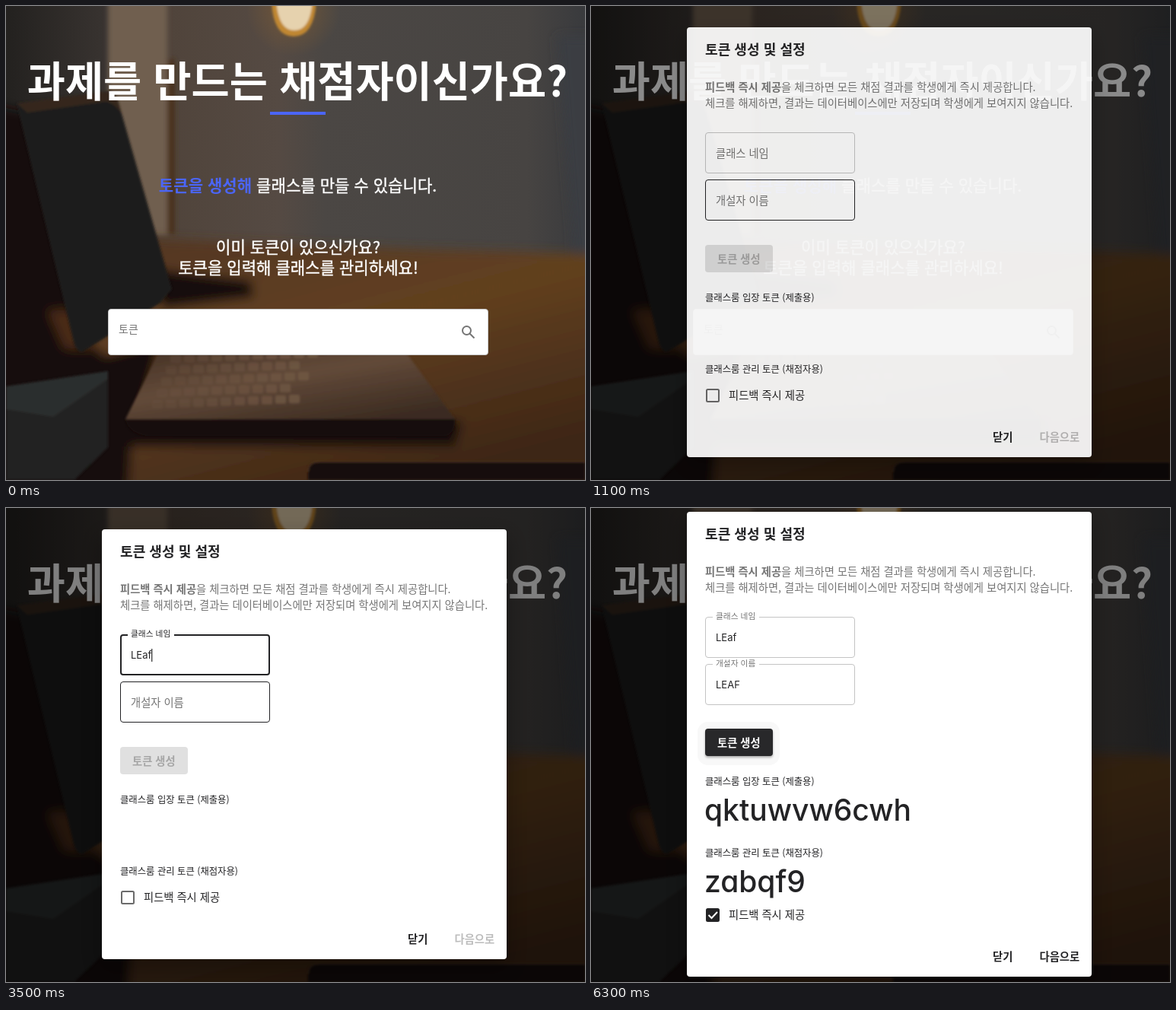
Write an HTML page that moves like this. It is 761 px wide and 623 px high and loops after 7900 ms.

```html
<!DOCTYPE html>
<html lang="ko">
<head>
<meta charset="utf-8">
<title>토큰 생성</title>
<style>
  html, body { margin: 0; width: 100%; height: 100%; overflow: hidden; background: #2b2623; }
  svg { display: block; width: 761px; height: 623px; }
  text { font: 14.3px "Noto Sans CJK KR", "Noto Sans CJK", sans-serif; fill: #232325; white-space: pre; }
  .page text { fill: #fff; font-size: 21.1px; font-weight: 500; text-anchor: middle; }
  .page .lead { stroke: #fff; stroke-width: .4px; }
  .page .head { font-size: 54.5px; font-weight: 700; }
  .page .hint { font-size: 14px; font-weight: 400; fill: #757575; text-anchor: start; }
  .link { fill: #4b65f7; font-weight: 700; stroke: none; }
  .bold { font-weight: 700; }
  .title { font-size: 18.1px; font-weight: 700; }
  .gray { fill: #757575; }
  .small { font-size: 12.35px; }
  .value { font: 13px Inter, sans-serif; }
  .token { font: 500 39px Inter, sans-serif; font-feature-settings: "cv11"; }
  #paper { filter: drop-shadow(0 11px 14px rgba(0, 0, 0, .3)); }
</style>
</head>
<body>
<svg viewBox="0 0 761 623">
  <defs>
    <linearGradient id="wall">
      <stop offset="0" stop-color="#23211f"/><stop offset=".17" stop-color="#383330"/>
      <stop offset=".28" stop-color="#50443b"/><stop offset=".47" stop-color="#554a43"/>
      <stop offset=".55" stop-color="#4b4744"/><stop offset=".9" stop-color="#474442"/>
      <stop offset="1" stop-color="#393a3d"/>
    </linearGradient>
    <linearGradient id="desk" x2=".6" y2="1">
      <stop offset="0" stop-color="#4f3424"/><stop offset=".5" stop-color="#62401f"/>
      <stop offset="1" stop-color="#3c2516"/>
    </linearGradient>
    <linearGradient id="base" x1=".2" x2=".8" y2="1">
      <stop offset="0" stop-color="#3f2c20"/><stop offset=".5" stop-color="#624a39"/>
      <stop offset="1" stop-color="#3a2a20"/>
    </linearGradient>
    <radialGradient id="glow">
      <stop offset="0" stop-color="#e8a52c" stop-opacity=".6"/><stop offset=".5" stop-color="#a36b25" stop-opacity=".2"/>
      <stop offset="1" stop-color="#a36b25" stop-opacity="0"/>
    </radialGradient>
    <filter id="soft"><feGaussianBlur stdDeviation="7"/></filter>
    <filter id="medium"><feGaussianBlur stdDeviation="3"/></filter>
    <filter id="crisp"><feGaussianBlur stdDeviation="1.5"/></filter>
    <clipPath id="buttonShape"><rect x="150" y="314" width="89" height="36" rx="4"/></clipPath>
  </defs>

  <rect width="761" height="623" fill="url(#wall)"/>
  <g filter="url(#medium)">
    <path d="M134-10h78v312h-78z" fill="#6f5f50"/>
    <path d="M212 70h10v230h-10z" fill="#4a301e"/>
  </g>
  <g filter="url(#soft)">
    <path d="M-20 340L190 306 560 320 790 326V650H-20z" fill="url(#desk)"/>
    <path d="M725 40h60v286h-38z" fill="#3a3d42"/>
    <path d="M-20 130L30 140 120 470-20 480z" fill="#17110d"/>
    <path d="M-20 330L45 370 130 460 205 440 165 575 160 650H-20z" fill="#150f0b"/>
    <path d="M55 400l50 0 12 50-40 0z" fill="#4a2a14"/>
    <path d="M190 345l132 16 4 22-120 14z" fill="#15100c"/>
    <path d="M130 545h470l-10 34H150z" fill="#130d0a"/>
  </g>
  <g filter="url(#crisp)">
    <path d="M14 128L132 112Q143 111 147 124L218 372 203 390 100 455Q92 455 88 438z" fill="#1e1c1a"/>
    <path d="M14 128L132 112Q143 111 147 124L152 142Q140 124 128 126L28 140z" fill="#35281f"/>
    <path d="M200 457L505 427 590 543H157z" fill="url(#base)"/>
    <path d="M157 543h433q1 18-12 22H185q-24-4-28-22z" fill="#16100d"/>
    <g id="keys" fill="#705743"/>
    <path d="M0 500L134 480V580L90 623H0z" fill="#222423"/>
    <path d="M0 500L134 480V490L62 540 0 530z" fill="#2c2e2d"/>
    <path d="M397 623v-12q0-12 14-12H761v24z" fill="#151110"/>
    <path d="M397 612q1-13 14-13H761" fill="none" stroke="#5d3c27"/>
  </g>
  <circle cx="378" cy="4" r="62" fill="url(#glow)"/>
  <g filter="url(#crisp)">
    <path d="M349-10h59q-2 50-30 50T349-10z" fill="#c08730"/>
    <path d="M355-10h48q-2 42-24 42T355-10z" fill="#e6d2ae"/>
  </g>

  <g class="page">
    <text class="head" x="383" y="119">과제를 만드는 채점자이신가요?</text>
    <rect x="347" y="139" width="73" height="4" fill="#4b65f7"/>
    <text class="lead" x="383.500" y="244"><tspan class="link">토큰을 생성해</tspan> 클래스를 만들 수 있습니다.</text>
    <text class="lead" x="384" y="324.5">이미 토큰이 있으신가요?</text>
    <text class="lead" x="384" y="351.5">토큰을 입력해 클래스를 관리하세요!</text>
    <rect x="134.5" y="398.5" width="499" height="60" rx="3.5" fill="#fff" stroke="#c8c8c8"/>
    <text class="hint" x="148" y="430">토큰</text>
    <g fill="none" stroke="#757575" stroke-width="2">
      <circle cx="605.5" cy="426.5" r="5.5"/><path d="M609.5 430.5l6 6"/>
    </g>
  </g>

  <rect id="shade" width="761" height="623"/>
  <g id="dialog">
    <rect id="paper" x="126" width="532" rx="4" fill="#fff"/>
    <g id="top">
      <text class="title" x="150" y="64">토큰 생성 및 설정</text>
      <text class="gray" x="150" y="112"><tspan class="bold">피드백 즉시 제공</tspan>을 체크하면 모든 채점 결과를 학생에게 즉시 제공합니다.</text>
      <text class="gray" x="150" y="133">체크를 해제하면, 결과는 데이터베이스에만 저장되며 학생에게 보여지지 않습니다.</text>
    </g>
    <g id="middle">
      <rect id="halo" x="140" y="305" width="108" height="57" rx="14" fill="#f8f8f8"/>
      <rect id="lift" x="150" y="316" width="89" height="36" rx="4" fill="#000" opacity=".3" filter="url(#crisp)"/>
      <rect id="button" x="150" y="314" width="89" height="36" rx="4"/>
      <circle id="ripple" cx="196" cy="332" fill="#fff" clip-path="url(#buttonShape)"/>
      <text id="buttonText" class="bold" x="166" y="337.5">토큰 생성</text>
      <text class="small" x="150" y="388">클래스룸 입장 토큰 (제출용)</text>
      <text class="small" x="150" y="482">클래스룸 관리 토큰 (채점자용)</text>
      <g id="tokens">
        <text class="token" x="149" y="435">qktuwvw6cwh</text>
        <text class="token" x="149" y="529">zabqf9</text>
      </g>
    </g>
    <g id="bottom">
      <rect id="box" x="152" y="504" width="16" height="16" rx="1.5" stroke-width="2"/>
      <path id="tick" d="M154.5 512l4 4 7.5-8" fill="none" stroke="#fff" stroke-width="2"/>
      <text x="181" y="517">피드백 즉시 제공</text>
      <text class="bold" x="528" y="572">닫기</text>
      <text id="next" class="bold" x="589.5" y="572">다음으로</text>
    </g>
  </g>
</svg>
<script>
const LOOP = 7900, DARK = '#232325';
const $ = id => document.getElementById(id);
const clamp = v => Math.min(1, Math.max(0, v));
const easeOut = p => 1 - (1 - clamp(p)) ** 3;

function add(parent, tag, attrs, text = '') {
  const node = document.createElementNS('http://www.w3.org/2000/svg', tag);
  set(node, attrs);
  node.textContent = text;
  return parent.appendChild(node);
}
function set(node, attrs) {
  for (const key in attrs) node.setAttribute(key, attrs[key]);
}
const show = (node, on) => set(node, { visibility: on ? 'visible' : 'hidden' });
const shift = (id, y) => set($(id), { transform: `translate(0 ${y})` });

for (let row = 0; row < 5; row++)
  for (let col = 0; col < 11 - row % 2; col++)
    add($('keys'), 'rect', { x: 216 - row * 6 + col * 18, y: 458 + row * 15 - col * .7, width: 14, height: 11, rx: 2, opacity: .25 + col * .06 });

// An outlined input whose label slides into a notch on focus.
function makeField(y, name, value, focusAt, blurAt, keyTimes, hovers) {
  const g = add($('top'), 'g', { transform: `translate(150 ${y})` });
  const frame = add(g, 'rect', { fill: 'none' });
  const notch = add(g, 'rect', { x: 10, y: -2, height: 5, fill: '#fff' });
  const label = add(g, 'text', {}, name);
  const text = add(g, 'text', { class: 'value', x: 14, y: 32 });
  const caret = add(g, 'rect', { y: 19, width: 1, height: 17, fill: '#000' });
  return t => {
    const focus = t >= focusAt && t < blurAt;
    const hover = hovers.some(([from, to]) => t >= from && t < to);
    const p = easeOut((t - focusAt + 50) / 200);
    const inset = focus ? 1 : .5;
    set(frame, { x: inset, y: inset, width: 197 - 2 * inset, height: 54 - 2 * inset, rx: 4 - inset,
      stroke: focus || hover ? DARK : '#c4c4c4', 'stroke-width': 2 * inset });
    set(notch, { width: 61 * p });
    set(label, { transform: `translate(14 ${32.5 - 29.5 * p}) scale(${1 - .25 * p})` });
    label.style.fill = focus ? DARK : '#757575';
    text.textContent = value.slice(0, keyTimes.filter(k => t >= k).length);
    show(caret, focus);
    set(caret, { x: 14 + text.getComputedTextLength() });
  };
}
const fields = [
  makeField(166, '클래스 네임', 'LEaf', 1500, 3600, [2000, 2600, 3100, 3200], [[1400, 1500]]),
  makeField(228, '개설자 이름', 'LEAF', 3600, 4800, [4100, 4300, 4500, 4500], [[0, 1400], [3500, 3600]])
];

function draw(t) {
  const fade = t < 1000 ? 0 : t < 1100 ? .22 : t < 1200 ? .92 : 1;
  set($('shade'), { opacity: fade / 2 });
  set($('dialog'), { opacity: fade });

  const done = t >= 5000;
  set($('paper'), { y: done ? 5 : 28, height: done ? 611 : 565 });
  shift('top', done ? -23 : 0);
  shift('middle', done ? -24 : 0);
  shift('bottom', done ? 23 : 0);
  fields.forEach(update => update(t));

  const enabled = t >= 4500;
  const level = enabled ? 40 + 184 * (1 - easeOut((t - 4435) / 250)) : 224;
  set($('button'), { fill: `rgb(${level},${level},${level + (enabled ? 2 : 0)})` });
  $('buttonText').style.fill = enabled ? '#fff' : '#a6a6a6';
  show($('halo'), t >= 4800);
  show($('lift'), enabled);
  set($('ripple'), { r: 55 * easeOut((t - 4800) / 500), opacity: .25 * clamp((5500 - t) / 500) });

  show($('tokens'), done);
  $('next').style.fill = done ? DARK : '#bdbdbd';
  const checked = t >= 6300;
  set($('box'), { fill: checked ? DARK : '#fff', stroke: checked ? DARK : '#6b6b6b' });
  show($('tick'), checked);
}

const start = performance.now();
let last = -1;
function tick() {
  // The picture advances in tenths of a second.
  const t = Math.floor((performance.now() - start) % LOOP / 100) * 100;
  if (t !== last) draw(last = t);
  requestAnimationFrame(tick);
}
tick();
</script>
</body>
</html>
```
